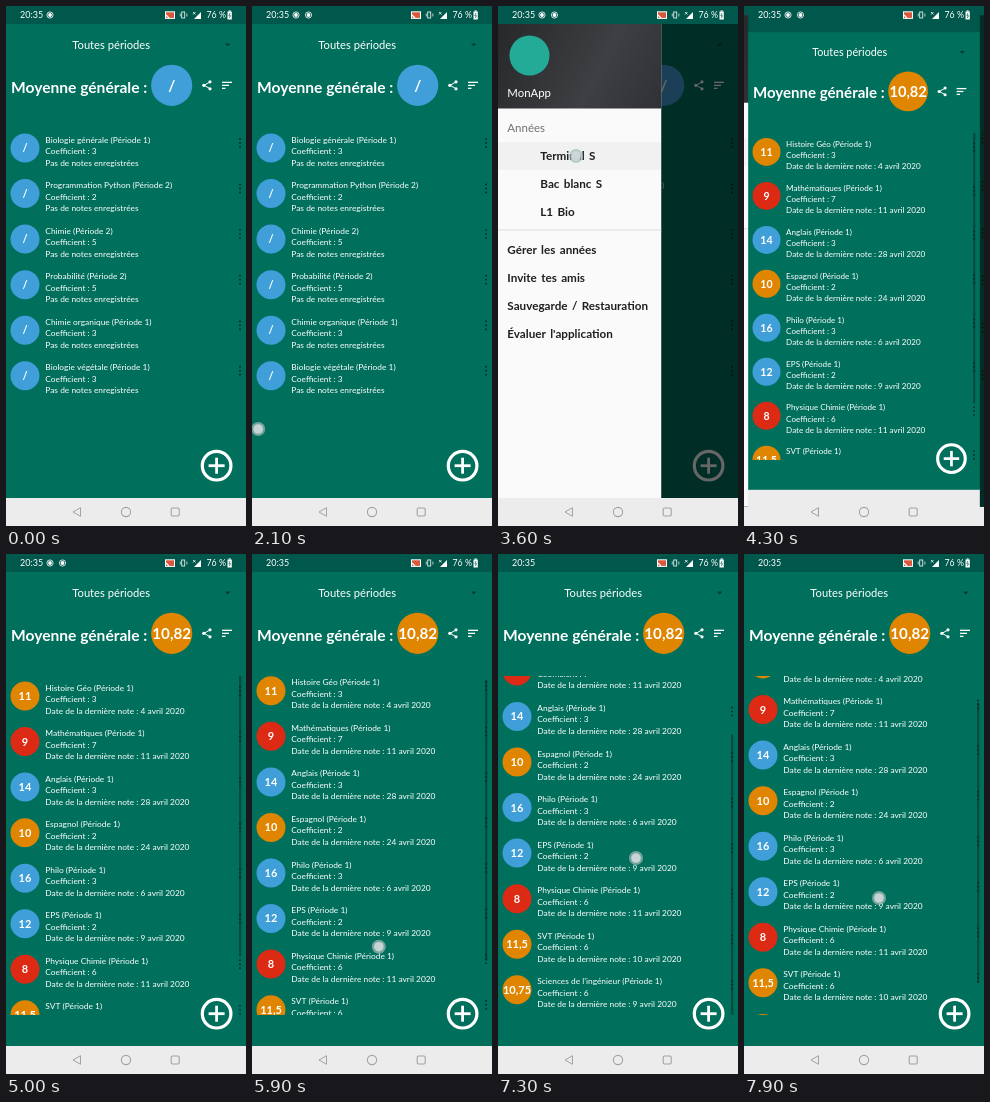
Write an HTML page with a canvas that moves like this. It is 240 px wide and 520 px high and loops after 8000 ms.

```html
<!DOCTYPE html>
<html lang="fr">
<head>
<meta charset="utf-8">
<title>Moyenne générale</title>
<style>
  html, body { margin: 0; width: 100%; height: 100%; overflow: hidden; background: #00705d; }
  canvas { display: block; width: 240px; height: 520px; }
</style>
</head>
<body>
<canvas id="stage"></canvas>
<script>
const W = 240, H = 520, LOOP = 8000;
const GREEN = '#00705d', BAR = '#00574b', LIGHT = '#ececec';
const BLUE = '#409fd8', ORANGE = '#df8500', RED = '#dc2a14';
const ROW = 45.55, LIST_TOP = 122, LIST_BOTTOM = 461, DRAWER = 163.5;
const canvas = document.getElementById('stage');
const c = canvas.getContext('2d');
const dpr = window.devicePixelRatio || 1;
canvas.width = W * dpr;
canvas.height = H * dpr;

const emptyPage = {
  average: '/', color: BLUE,
  rows: [
    ['Biologie générale', 1, 3], ['Programmation Python', 2, 2], ['Chimie', 2, 5],
    ['Probabilité', 2, 5], ['Chimie organique', 1, 3], ['Biologie végétale', 1, 3]
  ].map(([name, period, weight]) =>
    ({ name, period, weight, grade: '/', color: BLUE, note: 'Pas de notes enregistrées' }))
};
const gradedPage = {
  average: '10,82', color: ORANGE,
  rows: [
    ['Histoire Géo', 3, '11', ORANGE, 4], ['Mathématiques', 7, '9', RED, 11],
    ['Anglais', 3, '14', BLUE, 28], ['Espagnol', 2, '10', ORANGE, 24],
    ['Philo', 3, '16', BLUE, 6], ['EPS', 2, '12', BLUE, 9],
    ['Physique Chimie', 6, '8', RED, 11], ['SVT', 6, '11,5', ORANGE, 10],
    ["Sciences de l'ingénieur", 6, '10,75', ORANGE, 9]
  ].map(([name, weight, grade, color, day]) =>
    ({ name, period: 1, weight, grade, color, note: `Date de la dernière note : ${day} avril 2020` }))
};

const clamp = (v, a = 0, b = 1) => Math.min(b, Math.max(a, v));

// Piecewise linear value through [time, value] points.
function track(t, points) {
  if (t <= points[0][0]) return points[0][1];
  for (let i = 1; i < points.length; i++) {
    const [t0, a] = points[i - 1], [t1, b] = points[i];
    if (t <= t1) return a + (b - a) * (t - t0) / (t1 - t0);
  }
  return points[points.length - 1][1];
}

function text(str, x, y, size, { color = '#fff', weight = 400, align = 'left' } = {}) {
  c.font = `${weight} ${size}px Lato, sans-serif`;
  c.textAlign = align;
  c.textBaseline = 'alphabetic';
  c.fillStyle = color;
  c.fillText(str, x, y + size * 0.36);
}
function rect(x, y, w, h, color) {
  c.fillStyle = color;
  c.fillRect(x, y, w, h);
}
function disc(x, y, r, color) {
  c.beginPath();
  c.arc(x, y, r, 0, Math.PI * 2);
  c.fillStyle = color;
  c.fill();
}
function ring(x, y, r, width, color) {
  c.beginPath();
  c.arc(x, y, r, 0, Math.PI * 2);
  c.lineWidth = width;
  c.strokeStyle = color;
  c.stroke();
}
function path(points, { fill, stroke, width = 1, close = false }) {
  c.beginPath();
  points.forEach(([x, y]) => c.lineTo(x, y));
  if (close) c.closePath();
  if (fill) { c.fillStyle = fill; c.fill(); }
  if (stroke) { c.strokeStyle = stroke; c.lineWidth = width; c.stroke(); }
}

// Draws a whole window scaled around the middle of the content area.
function scaled(scale, alpha, drawWindow) {
  c.save();
  c.globalAlpha = alpha;
  c.translate(120, 256);
  c.scale(scale, scale);
  c.translate(-120, -256);
  drawWindow();
  c.restore();
}

function drawRow(row, top) {
  const mid = top + 20;
  disc(19, mid, 14.5, row.color);
  text(row.grade, 19, mid, 11, { weight: 700, align: 'center' });
  text(`${row.name} (Période ${row.period})`, 39.3, top + 11.5, 8.4);
  text(`Coefficient : ${row.weight}`, 39.3, top + 23, 8.4);
  text(row.note, 39.3, top + 34.5, 8.4);
  for (let i = -1; i <= 1; i++) disc(234, top + 15 + i * 4, 0.95, '#062b25');
}

function drawList(rows, scroll) {
  const view = LIST_BOTTOM - LIST_TOP, content = rows.length * ROW;
  c.save();
  c.beginPath();
  c.rect(0, LIST_TOP, W, view);
  c.clip();
  rows.forEach((row, i) => drawRow(row, LIST_TOP + i * ROW - scroll));
  if (content > view) {
    rect(233, LIST_TOP + scroll * view / content, 2.3, view * view / content, 'rgba(0,40,34,.5)');
  }
  c.restore();
}

function drawPage(page, scroll = 0) {
  rect(0, 491, W, 29, LIGHT);
  rect(0, 17, W, 475, GREEN);
  rect(0, 0, W, 18, BAR);
  text('Toutes périodes', 66.3, 39, 11.2);
  path([[219, 37.5], [224.5, 37.5], [221.75, 40.5]], { fill: '#003d33' });
  text('Moyenne générale :', 5, 81, 15.6, { weight: 700 });
  disc(165.7, 79.3, 20.6, page.color);
  text(page.average, 165.7, 79.3, 15.2, { weight: 700, align: 'center' });

  path([[204, 76], [198, 79.3], [204, 82.7]], { stroke: '#fff', width: 1 });
  [[204, 75.8], [197.8, 79.3], [204, 82.8]].forEach(([x, y]) => disc(x, y, 1.6, '#fff'));
  [10, 7, 3.5].forEach((w, i) => rect(216, 75.7 + i * 3, w, 1.3, '#fff'));

  drawList(page.rows, scroll);

  ring(210.6, 459.7, 14.3, 3.2, '#fff');
  rect(202.6, 458.3, 16, 2.8, '#fff');
  rect(209.2, 451.7, 2.8, 16, '#fff');
}

function drawDrawer(edge, pressed) {
  if (edge <= 0) return;
  rect(0, 18, W, 474, `rgba(0,0,0,${0.6 * edge / DRAWER})`);
  c.save();
  c.beginPath();
  c.rect(0, 18, edge, 474);
  c.clip();
  c.translate(edge - DRAWER, 0);
  rect(0, 18, DRAWER, 474, '#fafafa');

  const board = c.createLinearGradient(0, 18, DRAWER, 102);
  board.addColorStop(0, '#27282a');
  board.addColorStop(0.6, '#3e3f42');
  board.addColorStop(1, '#303134');
  rect(0, 18, DRAWER, 84.5, board);
  disc(31.5, 49.5, 20, '#23ab98');
  text('MonApp', 9.3, 87, 11.4);

  if (pressed > 0) rect(0, 136, DRAWER, 28, `rgba(0,0,0,${0.1 * pressed})`);
  text('Années', 9.3, 121.5, 11.5, { color: '#707070' });
  c.wordSpacing = '1.5px';
  const item = (label, x, y) => text(label, x, y, 11.7, { color: '#1f1f1f', weight: 700 });
  ['Terminal S', 'Bac blanc S', 'L1 Bio'].forEach((s, i) => item(s, 42.3, 149.5 + i * 28));
  rect(0, 223.5, DRAWER, 1, '#dcdcdc');
  ['Gérer les années', 'Invite tes amis', 'Sauvegarde / Restauration', "Évaluer l'application"]
    .forEach((s, i) => item(s, 9.3, 243.7 + i * 28));
  c.restore();
}

function drawStatus(t) {
  text('20:35', 14, 9, 9);
  const dots = t < 300 ? 1 : t < 5500 ? 2 : 0;
  for (let i = 0; i < dots; i++) {
    ring(44 + i * 12.5, 9, 3.1, 0.8, '#fff');
    disc(44 + i * 12.5, 9, 1.9, '#fff');
  }
  rect(159, 5.3, 10, 7.6, '#fff');
  rect(160, 6.3, 8, 5.6, '#d9573c');
  path([[160, 9], [163, 12]], { stroke: '#fff', width: 1.2 });

  c.strokeStyle = '#dcebe8';
  c.lineWidth = 0.9;
  c.strokeRect(175.7, 6, 3, 6);
  [173.8, 180.5].forEach(x => rect(x, 7.5, 0.8, 3, '#dcebe8'));
  path([[188, 13], [195, 13], [195, 6]], { fill: '#fff' });
  path([[187, 6], [189.5, 8.5]], { stroke: '#fff', width: 0.8 });
  path([[189.5, 6], [187, 8.5]], { stroke: '#fff', width: 0.8 });
  text('76 %', 200.5, 9, 8.8);
  rect(221.5, 5.5, 4.3, 8, '#fff');
  rect(222.6, 4.4, 2.1, 1.2, '#fff');
  path([[224, 7], [222.8, 9.7], [224.5, 9.7], [223.3, 12]], { stroke: BAR, width: 0.7 });
}

function drawNavIcons() {
  const gray = '#a2a2a2';
  path([[67, 506], [74.5, 501.7], [74.5, 510.3]], { stroke: gray, close: true });
  ring(120, 506, 4.6, 1.1, gray);
  c.beginPath();
  c.roundRect(165.2, 502, 8, 8, 1.2);
  c.stroke();
}

function drawTouch(x, y, alpha = 1) {
  c.save();
  c.globalAlpha = alpha;
  disc(x, y, 7, 'rgba(165,185,185,.7)');
  disc(x, y, 4.8, 'rgba(208,217,219,.9)');
  c.restore();
}

// The list follows the finger once it has moved past a small threshold.
const scrollAt = t => track(t, [[5850, 0], [6300, 46], [6750, 70.7], [7300, 70.7], [7900, 32]]);
const fingerY = t => track(t, [[5800, 403], [6300, 352], [6900, 302], [7200, 300], [7300, 304], [7900, 344]]);
const fingerX = t => track(t, [[5800, 126], [6300, 130], [7300, 138], [7900, 135]]);

function draw(t) {
  c.setTransform(dpr, 0, 0, dpr, 0, 0);
  rect(0, 0, W, H, LIGHT);
  const enter = clamp((t - 4050) / 500);
  const rest = (1 - enter) ** 2;

  if (enter < 1) {
    scaled(1 + 0.05 * (1 - rest), 1, () => {
      drawPage(emptyPage);
      const edge = track(t, [[2100, 0], [2250, 14], [2700, 125], [2900, DRAWER]]);
      drawDrawer(edge, clamp((t - 3550) / 150) * rest);
    });
  }
  if (enter > 0) {
    scaled(1 - 0.14 * rest, clamp(enter * 3), () => drawPage(gradedPage, scrollAt(t)));
  }
  drawNavIcons();
  drawStatus(t);

  if (t >= 2100 && t < 3000) {
    drawTouch(track(t, [[2100, 6], [2250, 38], [2700, 150], [2900, 186]]), 423, clamp((3000 - t) / 80));
  }
  if (t >= 3600 && t < 3800) drawTouch(78, 150);
  if (t >= 5800) drawTouch(fingerX(t), fingerY(t));
}

function loop() {
  draw(performance.now() % LOOP);
  requestAnimationFrame(loop);
}
loop();
</script>
</body>
</html>
```
